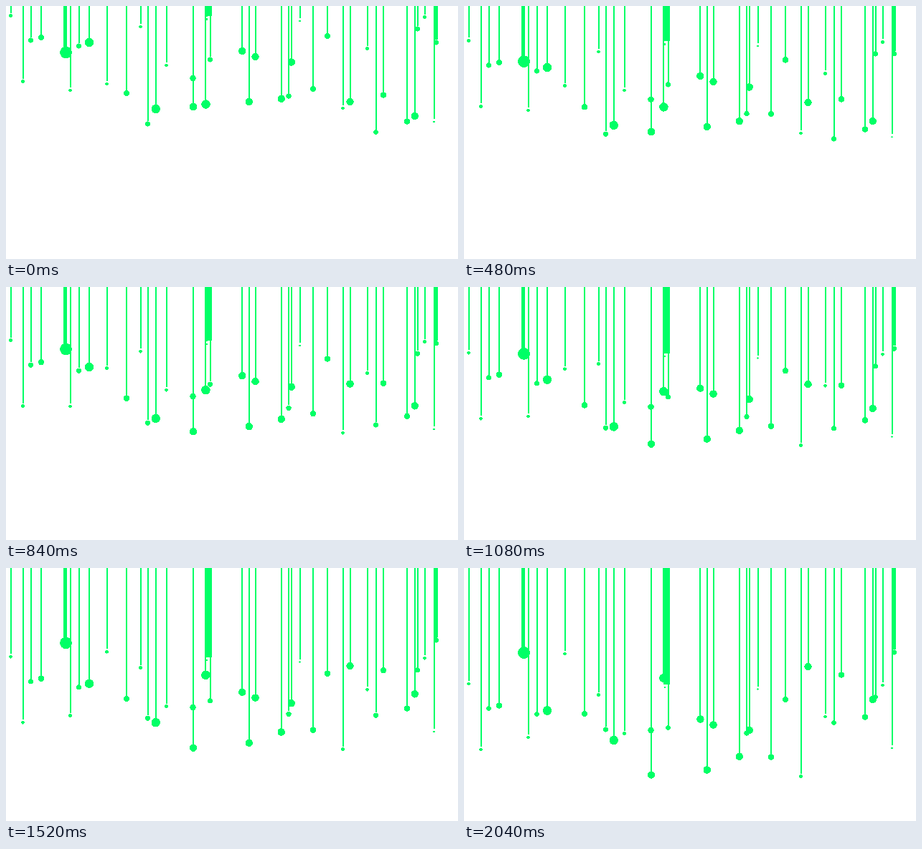
An HTML page with a canvas for the animation above (2.08 s loop, 630 by 354 pixels).

```html
<!DOCTYPE html>
<html lang="en">
<head>
<meta charset="utf-8">
<title>Green drips</title>
<style>
html, body { margin: 0; width: 100%; height: 100%; overflow: hidden; background: #fff; }
canvas { display: block; }
</style>
</head>
<body>
<canvas id="stage" width="630" height="354"></canvas>
<script>
const ctx = document.getElementById('stage').getContext('2d');
const W = 630, H = 354;
const LOOP = 2080, STEP = 40, SPAN = LOOP - STEP;
const FALL = 148.5; // usual distance covered in one loop
const STRING = 2, GAP = 4; // string width, and its distance from the drop's centre

// Drops by size: x, first y, and the fall of those slower than usual
const sizes = [
  { r: 1.2, drops: [[280, 18.5], [409.5, 21], [596.5, 162, 90]] },
  { r: 2.4, drops: [[6.5, 13.5], [23.5, 105.5], [187.5, 29], [223.5, 83], [469.5, 143],
    [503.5, 59.5], [583.5, 15.5], [89.5, 118, 119], [140.5, 109, 11]] },
  { r: 3.6, drops: [[34.5, 48], [101.5, 56], [284.5, 75], [573.5, 32], [197.5, 165, 61],
    [394, 126, 105], [515.5, 176.5, 40], [599.5, 51, 67]] },
  { r: 4.2, drops: [[49, 44], [428, 116], [168, 122, 82], [260.5, 101, 126],
    [448, 42, 142], [526, 124.5, 25], [559, 161.5, 47]] },
  { r: 5.2, drops: [[261, 141], [329.3, 63], [338.7, 134], [347.5, 71], [397.7, 78.5],
    [383.7, 129.7, 134], [479.5, 134, 4], [569.7, 154, 30]] },
  { r: 6.2, drops: [[116, 51], [208.7, 144, 97], [278.4, 137.5, 16.5]] },
  { r: 8.3, drops: [[83.5, 65, 53.5]] }
];

// Broad strings: left edge, width, first end, fall
const bands = [[80, 3, 61, 53.5], [278, 9, 14, FALL], [597, 5, 47, 67]];

// Hard-edged disc, one row at a time
function disc(x, y, r) {
  for (let row = Math.floor(y - r); row <= y + r; row++) {
    const half = Math.sqrt(Math.max(0, r * r - (row + 0.5 - y) ** 2));
    const left = Math.round(x - half);
    ctx.fillRect(left, row, Math.round(x + half) - left, 1);
  }
}

function string(left, width, end) {
  ctx.fillRect(left, 0, width, Math.max(0, Math.round(end)));
}

function draw(t) {
  const k = t / SPAN;
  ctx.fillStyle = '#fff';
  ctx.fillRect(0, 0, W, H);
  ctx.fillStyle = '#00ff66';
  for (const [left, width, end, fall] of bands) string(left, width, end + fall * k);
  for (const { r, drops } of sizes) {
    for (const [x, y0, fall = FALL] of drops) {
      const y = y0 + fall * k;
      string(Math.floor(x - STRING / 4), STRING, y - GAP);
      disc(x, y, r);
    }
  }
}

const start = performance.now();
function tick() {
  const t = (performance.now() - start) % LOOP;
  draw(Math.floor(t / STEP) * STEP);
  requestAnimationFrame(tick);
}
tick();
</script>
</body>
</html>
```
